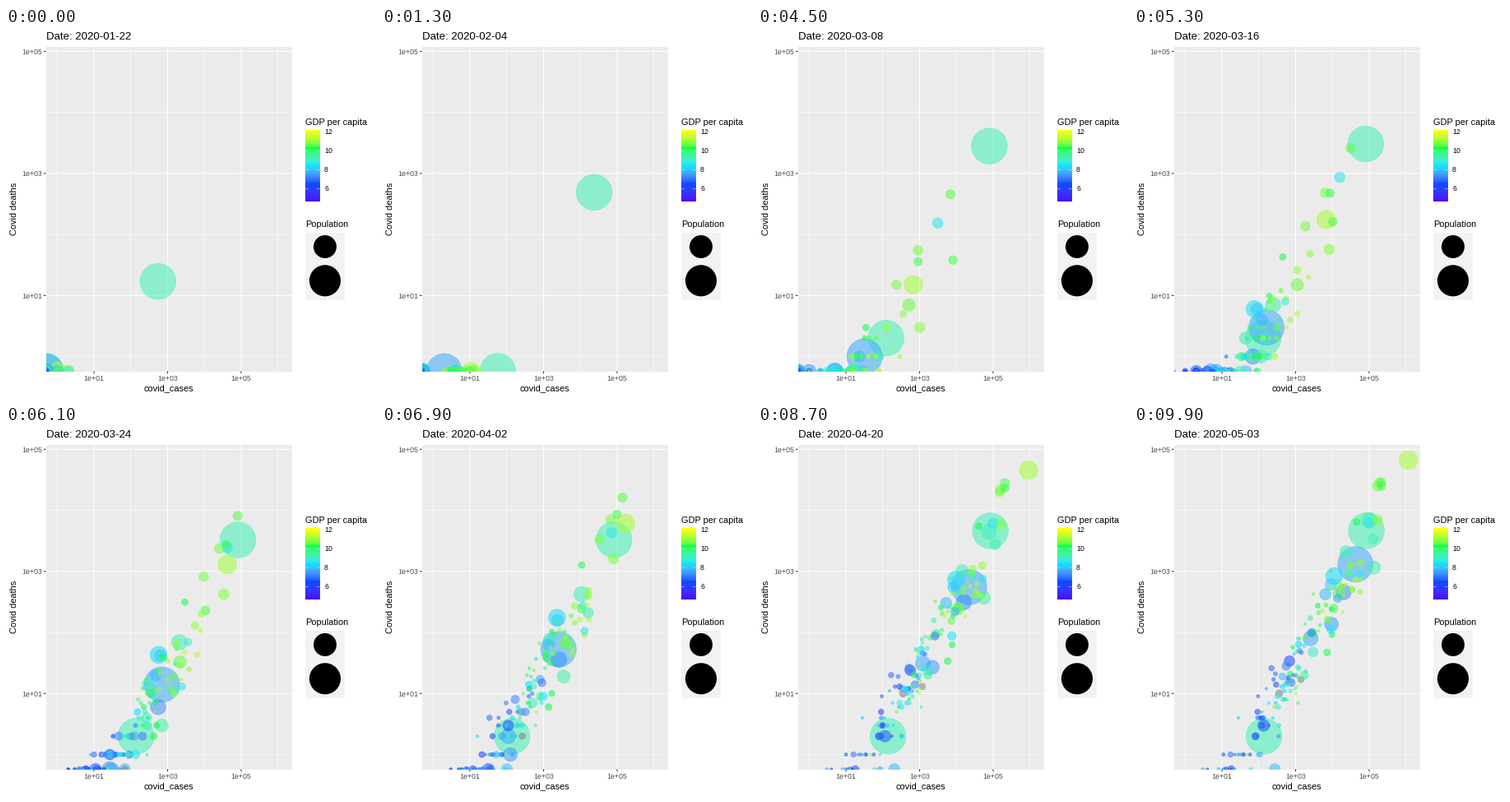
These frames come from a looping animation (450 px wide and 450 px high, 10000 ms). A matplotlib script:

```python
import matplotlib.pyplot as plt
import numpy as np
from matplotlib.animation import FuncAnimation
from matplotlib.patches import Circle, Rectangle

SIZE, FRAMES, DAYS = 450, 100, 102
LEFT, RIGHT, TOP, BOTTOM = 48.5, 348, 23, 417.5
GDP_MIN, GDP_MAX = 4.6, 12.1
PALETTE = ("#4C00FF", "#004CFF", "#00E5FF", "#00FF4D", "#FFFF00")
ALPHA, STROKE = .55, .7
T = np.arange(FRAMES)

# sRGB <-> Lab, so that the colour ramp blends evenly
XYZ = np.array([[.4124, .3576, .1805], [.2126, .7152, .0722], [.0193, .1192, .9505]])
WHITE = XYZ.sum(axis=1)
LAB = np.array([[0, 116, 0], [500, -500, 0], [0, 200, -200]])

plt.rcParams["font.family"] = "Liberation Sans"


def to_lab(rgb):
    lin = np.where(rgb <= .04045, rgb / 12.92, ((rgb + .055) / 1.055) ** 2.4)
    t = lin @ XYZ.T / WHITE
    f = np.where(t > .008856, np.cbrt(t), 7.787 * t + 16 / 116)
    return f @ LAB.T - [16, 0, 0]


def to_rgb(lab):
    f = (lab + [16, 0, 0]) @ np.linalg.inv(LAB).T
    t = np.where(f > .2069, f ** 3, (f - 16 / 116) / 7.787)
    lin = np.clip((t * WHITE) @ np.linalg.inv(XYZ).T, 0, 1)
    return np.clip(np.where(lin <= .0031308, lin * 12.92, 1.055 * lin ** (1 / 2.4) - .055), 0, 1)


STOPS = to_lab(np.array([[int(c[i:i + 2], 16) / 255 for i in (1, 3, 5)] for c in PALETTE]))


def gdp_color(gdp):
    t = (np.asarray(gdp) - GDP_MIN) / (GDP_MAX - GDP_MIN) * 4
    return to_rgb(np.stack([np.interp(t, range(5), s) for s in STOPS.T], axis=-1))


def radius(pop):
    return 1.4 + 20.4 * np.sqrt(pop / 1393)


def px(log):
    return 62.25 + 44.75 * log


def py(log):
    return 399.6 - 74.25 * log


bubbles = []


def add(pop, gdp, cases, deaths):
    """Place whole counts on the log axes; zero sits on the panel edge."""
    cases, deaths = np.round(cases), np.round(deaths)
    x = np.where(cases > 0, px(np.log10(np.maximum(cases, 1))), LEFT)
    y = np.where(deaths > 0, py(np.log10(np.maximum(deaths, 1))), BOTTOM)
    color = gdp_color(gdp) if gdp else np.full(3, .5)
    bubbles.append((radius(pop), color, np.column_stack([x, y])))


def keyed(pop, gdp, ticks, cases, deaths):
    def curve(counts):
        return 10 ** np.interp(T, ticks, np.log10(np.maximum(counts, .3)))
    add(pop, gdp, curve(cases), curve(deaths))


def outbreak(pop, gdp, start, pace, final, fatality, lag=3, arrival=None):
    """Log cases ease out from one at start to final; deaths follow with a lag."""
    def cases(t):
        u = np.clip((t - start) / (FRAMES - 1 - start), 0, 1)
        return np.where(t < start, 0, final ** (1 - (1 - u) ** pace))

    seen = cases(T)
    if arrival is not None:
        imported = np.minimum(1 + .8 * (T - arrival), max(1, 4 * (gdp - 7)))
        seen = np.maximum(seen, np.where(T < arrival, 0, imported))
    add(pop, gdp, seen, fatality * cases(T - lag))


# Population in millions and log GDP per capita come first
keyed(1393, 9.19, (0, 5, 13, 22, 31, 61, 82, 83),
      (548, 2900, 23700, 59900, 76940, 81660, 82900, 83900),
      (17, 82, 491, 1371, 2443, 3285, 3342, 4637))
keyed(1393, 9.19, (0, 3, 13, 31, 45, 61), (0, 8, 57, 91, 123, 139), (0, 0, 0, 2, 2, 2))

outbreak(1352, 7.6, 30, 1.6, 42500, .033, arrival=9)
outbreak(327, 11.05, 28, 2.3, 1.16e6, .058, arrival=0)
outbreak(267, 8.27, 41, 2.7, 11200, .075, lag=0)
outbreak(212, 7.3, 41, 2.4, 20100, .023)
outbreak(209, 9.1, 38, 2.3, 102000, .069)
outbreak(196, 7.62, 46, 1.6, 2560, .034)
outbreak(161, 7.43, 43, 1.2, 9450, .019)
outbreak(144, 9.34, 35, 1.55, 135000, .0095, arrival=9)
outbreak(126, 10.58, -5, 1.6, 15100, .036, lag=10)
outbreak(126, 9.18, 40, 1.9, 23500, .092)
outbreak(109, 6.65, 49, 2.4, 135, .022)
outbreak(107, 8.04, 41, 2.9, 9220, .066, lag=0, arrival=9)
outbreak(98, 7.84, 33, 2.2, 6460, .066)
outbreak(95, 7.85, -5, 1.4, 271, 0)
outbreak(84, 6.3, 48, 2.4, 682, .05)
outbreak(83, 10.77, 29, 3.3, 166000, .042, lag=7, arrival=6)
outbreak(82, 9.15, 48, 3.3, 126000, .027)
outbreak(82, 8.6, 26, 4, 97400, .064, lag=1)
outbreak(69, 8.9, -5, 1.2, 2970, .018)
outbreak(67, 10.63, 27, 2.9, 169000, .147, arrival=3)
outbreak(66, 10.66, 29, 2.3, 188000, .152, arrival=10)
outbreak(60, 10.45, 22, 3.6, 211000, .137, arrival=9)
outbreak(52, 10.41, 25, 11, 10800, .023, lag=10, arrival=0)
outbreak(47, 10.32, 30, 3.3, 217000, .116, arrival=10)
outbreak(29, None, 47, 5, 357, .028)
outbreak(20, None, 45, 2.5, 1400, .012)

# Smaller countries: the rich start early, the rich and populous reach more cases
rng = np.random.default_rng(20)
for _ in range(130):
    gdp = rng.uniform(6, 11.2)
    size = rng.uniform(-.8, 1.7)
    log_final = np.clip(1.5 + .4 * (gdp - 6) + .65 * size + rng.normal(0, .5), .5, 4.75)
    outbreak(10 ** size, gdp, 50 - 3.2 * (gdp - 6) + rng.normal(0, 3), rng.uniform(2, 4),
             10 ** log_final, 10 ** rng.normal(-1.55, .33), rng.uniform(0, 5),
             rng.uniform(2, 40) if gdp > 10 else None)

fig = plt.figure(figsize=(SIZE / 72, SIZE / 72), dpi=72, facecolor="white")
ax = fig.add_axes([0, 0, 1, 1])
ax.axis("off")


def label(x, y, text, size, color="black", **kw):
    return ax.text(x, y, text, fontsize=size, color=color, va="baseline", **kw)


def line(x, y, color, width, z=1):
    ax.plot(x, y, color=color, lw=width, zorder=z, solid_capstyle="butt", snap=False)


def box(x0, y0, x1, y1, color):
    return ax.add_patch(Rectangle((x0, y0), x1 - x0, y1 - y0, fc=color, lw=0, zorder=0))


panel = box(LEFT, TOP, RIGHT, BOTTOM, "#EBEBEB")
for e in range(7):
    major = e in (1, 3, 5)
    width = 1.07 if major else .53
    line([px(e)] * 2, [TOP, BOTTOM], "white", width)
    if e < 6:
        line([LEFT, RIGHT], [py(e)] * 2, "white", width)
    if major:
        line([px(e)] * 2, [BOTTOM, BOTTOM + 2.7], "#333333", 1.07)
        line([LEFT - 2.7, LEFT], [py(e)] * 2, "#333333", 1.07)
        label(px(e), 429, f"1e+0{e}", 8.8, "#4D4D4D", ha="center")
        label(43.7, py(e) + 3.2, f"1e+0{e}", 8.8, "#4D4D4D", ha="right")

title = label(49, 14, "", 13.2)
label(198, 441.4, "covid_cases", 11, ha="center")
label(13, 220, "Covid deaths", 11, ha="center", rotation=90, rotation_mode="anchor")

label(364, 118, "GDP per capita", 11)
ramp = gdp_color(np.linspace(GDP_MAX, GDP_MIN, 300))[:, None, :]
ax.imshow(ramp, extent=(364.3, 381.6, 211.4, 125), aspect="auto", zorder=1)
for v in (6, 8, 10, 12):
    y = 195.3 - (v - 6) * 11.55
    for x in (364.3, 378.1):
        line([x, x + 3.5], [y, y], "white", .5, 2)
    label(387, y + 3.2, str(v), 8.8)

label(364, 242, "Population", 11)
box(364, 249, 412, 331, "#F2F2F2")
for y, pop in ((266, 500), (307.3, 1000)):
    ax.add_patch(Circle((388, y), radius(pop) + STROKE / 2, fc="black", lw=0, zorder=2))

radii, colors, paths = zip(*bubbles)
rgba = np.column_stack([colors, np.full(len(colors), ALPHA)])
paths = np.array(paths)
dots = ax.scatter(paths[:, 0, 0], paths[:, 0, 1], s=(2 * np.array(radii)) ** 2,
                  facecolors=rgba, edgecolors=rgba, linewidths=STROKE, zorder=3)
dots.set_clip_path(panel)
ax.set(xlim=(0, SIZE), ylim=(SIZE, 0))


def update(i):
    date = np.datetime64("2020-01-22") + i * DAYS // (FRAMES - 1)
    title.set_text(f"Date: {date}")
    dots.set_offsets(paths[:, i])
    return dots, title


anim = FuncAnimation(fig, update, frames=FRAMES, interval=100, repeat=True, repeat_delay=0)
plt.show()
```
